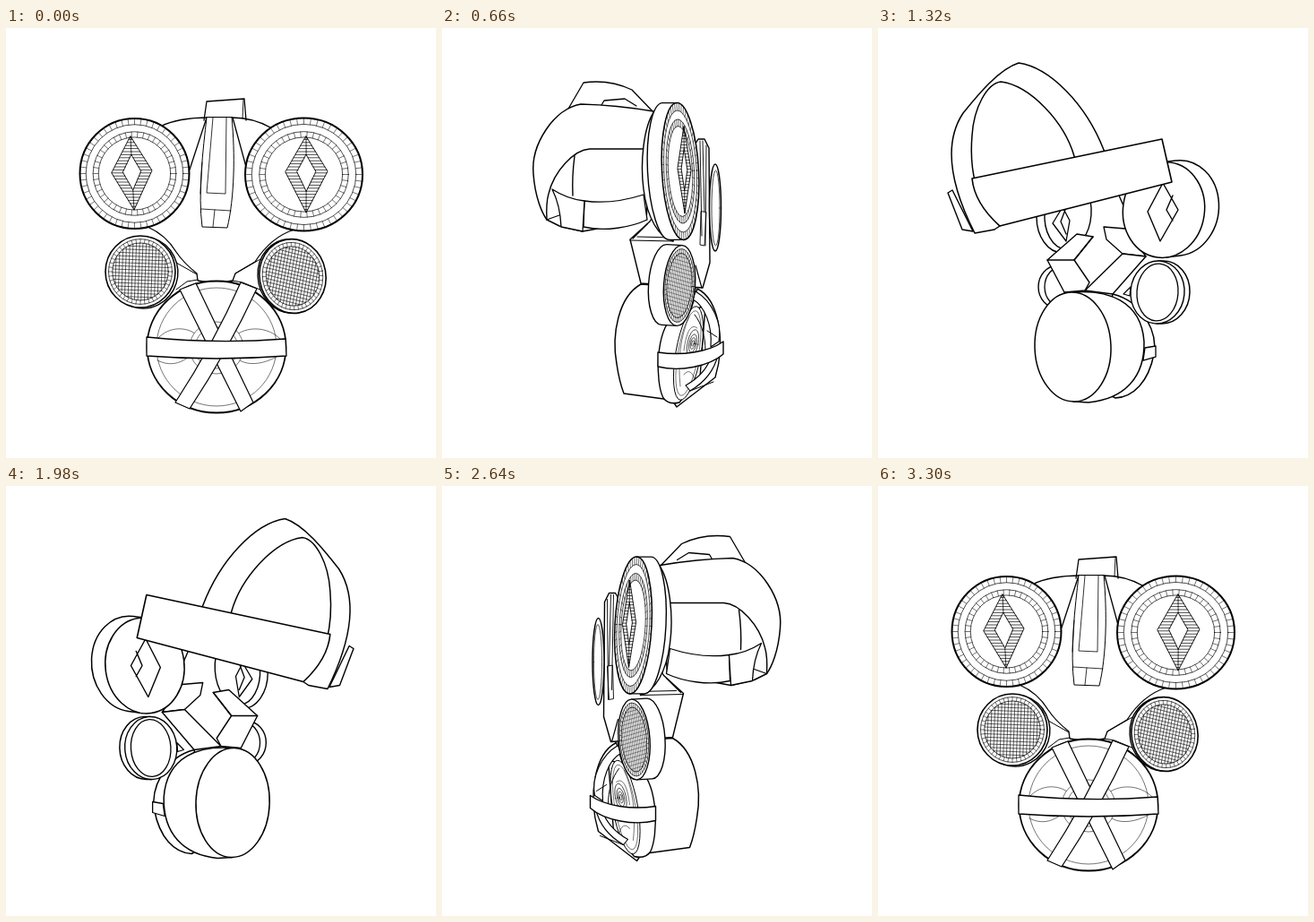
An HTML page that plays this animation: 480 by 480 pixels, repeating every 3.63 s.

```html
<!DOCTYPE html>
<html lang="en">
<head>
<meta charset="utf-8">
<title>Turning mask</title>
<style>
html, body { margin: 0; width: 100%; height: 100%; overflow: hidden; background: #fff; }
svg { display: block; width: 100vw; height: 100vh; }
path, circle { stroke: #000; stroke-linejoin: round; stroke-linecap: round; vector-effect: non-scaling-stroke; }
</style>
</head>
<body>
<svg id="stage" viewBox="0 0 480 480"></svg>
<script>
const STEP = 330, LOOP = 3630, THIN = 0.55;
const n = v => +v.toFixed(3);

// Filled shape, open line, ellipse with contents drawn in unit space
const shape = (d, w = 1.4, fill = '#fff') => `<path d="${d}" stroke-width="${w}" fill="${fill}"/>`;
const line = (d, w = 1.4) => shape(d, w, 'none');
const oval = (x, y, rx, ry, rot = 0, w = 1.4, inner = '', fill = '#fff') =>
  `<g transform="translate(${x} ${y}) rotate(${rot}) scale(${rx} ${ry})">` +
  `<circle r="1" stroke-width="${w}" fill="${fill}"/>${inner}</g>`;
const ring = (r, w = .7) => `<circle r="${r}" stroke-width="${w}" fill="none"/>`;
const flip = (body, sum, dy = 0, k = 1) => `<g transform="matrix(${-k} 0 0 1 ${sum} ${dy})">${body}</g>`;

function ticks(r1, r2, count) {
  let d = '';
  for (let i = 0; i < count; i++) {
    const a = i / count * 2 * Math.PI, c = Math.cos(a), s = Math.sin(a);
    d += `M${n(c * r1)} ${n(s * r1)}L${n(c * r2)} ${n(s * r2)}`;
  }
  return line(d, THIN);
}

function mesh(r, cells, turn, w) {
  let d = '';
  for (let i = 1; i < cells; i++) {
    const p = n(r * (2 * i / cells - 1)), h = n(Math.sqrt(r * r - p * p));
    d += `M${p} ${-h}V${h}M${-h} ${p}H${h}`;
  }
  return `<g transform="rotate(${turn})">${line(d, w)}</g>`;
}

// Side wall of a disc pushed back by dx, dy
function wall(x, y, rx, ry, rot, dx, dy, w = 1.4) {
  const a = rot * Math.PI / 180, c = Math.cos(a), s = Math.sin(a);
  const u = (c * dx + s * dy) / rx, v = (c * dy - s * dx) / ry, h = Math.hypot(u, v);
  const px = -v / h * rx, py = u / h * ry;
  const ex = c * px - s * py, ey = s * px + c * py;
  return shape(`M${n(x + ex)} ${n(y + ey)}l${dx} ${dy}A${rx} ${ry} ${rot} 0 0 ` +
    `${n(x - ex + dx)} ${n(y - ey + dy)}l${-dx} ${-dy}Z`, w);
}

const lensRings = ring(.89) + ticks(.89, 1, 52) + ring(.76) + ring(.66) + ticks(.66, .76, 42);
const lens = (x, y, rx, ry, rot = 0, w = 2) => oval(x, y, rx, ry, rot, w, lensRings);
const filter = (x, y, rx, ry, rot = 0, turn = 0, w = 1.6) =>
  oval(x, y, rx, ry, rot, w, ring(.91) + ring(.8) + ticks(.8, .91, 44) + mesh(.8, 17, turn, rx < 20 ? .4 : .6));

// x on a polyline that runs downwards
function xAt(pts, y) {
  for (let i = 1; i < pts.length; i++) {
    const [x0, y0] = pts[i - 1], [x1, y1] = pts[i];
    if (y <= y1) return x0 + (x1 - x0) * (y - y0) / (y1 - y0);
  }
  return pts[pts.length - 1][0];
}

function diamond(t, r, b, l, gap = 3.4) {
  const cx = (t[0] + r[0] + b[0] + l[0]) / 4, cy = (l[1] + r[1]) / 2;
  const [it, ir, ib, il] = [t, r, b, l].map(p => [cx + (p[0] - cx) * .45, cy + (p[1] - cy) * .48]);
  let d = `M${t}L${it}M${b}L${ib}`;
  for (let y = t[1] + gap; y < b[1]; y += gap) {
    for (const [o, i] of [[l, il], [r, ir]]) {
      d += `M${n(xAt([t, o, b], y))} ${n(y)}L${n(xAt([t, it, i, ib, b], y))} ${n(y)}`;
    }
  }
  const box = q => `M${q.join('L')}Z`;
  return line(box([t, r, b, l]), .9) + line(d, .7) + line(box([it, ir, ib, il]), .9);
}

function front() {
  return shape('M221 103L224 82L266 79L268 103', 1.3) + line('M265 80L264 101', .9) +
    line('M172 110C190 101 212 100 226 100H252C272 100 285 105 297 112', 1.3) +
    line('M224 100L205 158M253 100L268 155', 1.3) +
    shape('M224 100C220 135 214 185 219 222L247 223C255 190 256 140 252 100Z', 1) +
    line('M231 100L224 184L245 185L246 100M218 202L251 204M233 203L231 222M219 150L217 185', .8) +
    line('M158 222C172 228 182 237 190 250Q198 262 213 274L214 282Q234 286 253 282L256 274L278 261Q296 233 322 225', 1.3) +
    line('M190 262L213 275M190 292L202 283L214 281M256 274L284 258M253 282L264 284L286 293', 1) +
    lens(143.5, 162.5, 61, 61.5) + diamond([139, 121], [163, 159], [143, 203], [118, 162]) +
    lens(332.5, 163.5, 65.5, 63) + diamond([335, 121], [359, 160], [335, 206], [312, 161]) +
    wall(150, 272, 39, 40, 0, 3, 1) + filter(150, 272, 39, 40, 0, 2) +
    wall(320, 277, 37, 41.5, -10, -2, 0) + filter(320, 277, 37, 41.5, -10, 22) +
    oval(235, 356, 77.5, 73.5, 0, 1.8) + oval(235, 356, 67, 66, 0, THIN) +
    line('M169 371C181 377 193 376 204 367M170 346C182 333 203 332 216 345M254 345C268 332 292 333 306 347M258 369C270 379 290 374 302 367', THIN) +
    oval(235, 357, 30, 29, 0, THIN) + oval(235, 357, 24, 23, 0, THIN) + oval(235, 357, 16, 15, 0, THIN) +
    shape('M194 292L212 285L276 418L262 428Z', 1.2) +
    shape('M262 284L280 291Q248 360 205 425L189 418Q232 352 262 284Z', 1.2) +
    shape('M157 345Q235 353 312 347L313 366Q235 372 157 366Z', 1.3);
}

function quarter() {
  return shape('M227 94L242 73L280 64L299 65L308 73L349 97L383 106L382 124L374 172C368 192 358 201 345 208L316 212Z', 1.2) +
    line('M227 94L261 90Q268 72 284 66M358 158L374 142L376 155M360 160C366 180 352 198 338 206', 1.2) +
    line('M294 217V228M262 216L269 220L251 233', 1.2) +
    line('M160 215C162 228 170 239 175 250Q180 263 186 265L183 272M186 265L210 268L235 251L251 233M210 268L219 273M168 237L180 268M235 251L230 262', 1.3) +
    line('M199 101L186 150M231 98L236 110', 1.4) +
    shape('M199 102C194 135 190 180 193 217L211 218C219 182 229 140 230 98L216 95Z', 1) +
    line('M204 101L197 180L210 182L219 97M192 198L214 200M203 199L201 217M221 97L216 175', .8) +
    wall(152.5, 167.5, 30.5, 53.5, 8, 7, 0) + lens(152.5, 167.5, 30.5, 53.5, 8, 1.7) +
    diamond([153, 135], [161, 163], [147, 203], [138, 170]) +
    wall(289.5, 145, 62.5, 72.5, 12, 8, -1) + lens(289.5, 145, 62.5, 72.5, 12) +
    diamond([291, 97], [306, 147], [276, 193], [262, 146]) +
    shape('M262 300L283 311Q293 312 293 332C289 375 270 402 242 406L215 405Z', 1.2) +
    oval(210.5, 338, 54.5, 70, -8, 1.7) + oval(206, 338, 47, 66, -8, THIN) +
    line('M206 318C216 298 230 295 243 308M219 345C235 343 245 350 250 362M205 360C217 370 220 385 218 400M177 355C184 365 186 375 183 388', THIN) +
    [20, 15, 11, 7, 3.5].map(r => oval(197, 338, r * .8, r * 1.15, -6, r > 12 ? THIN : .8)).join('') +
    shape('M166 278L175 271C170 312 175 355 182 392L173 391C163 350 161 312 166 278Z', 1.1) +
    shape('M219 271L233 281C203 300 184 325 173 354L164 349C175 318 193 290 219 271Z', 1.1) +
    shape('M164 351L174 359C184 382 206 397 229 404L216 408C190 398 173 377 164 351Z', 1.1) +
    shape('M153 321C178 341 220 348 267 345L266 360C220 366 178 360 154 340Z', 1.3) +
    filter(158.5, 259.5, 12, 33, -3, 3, 1.2) +
    wall(269.5, 268.5, 39, 44.5, -8, 7, 0) + filter(269.5, 268.5, 39, 44.5, -8, 2);
}

function side() {
  return line('M137 97L158 61Q187 57 212 69L236 94M178 86L181 81L204 79L217 87', 1.3) +
    shape('M155 85C125 90 99 130 102 163C104 190 112 207 117 214L131 221L157 227L228 214L236 93Q195 86 155 85Z', 1.5) +
    line('M224 135H165C147 136 125 160 119 185Q116 195 117 214M148 143Q145 165 146 187', 1.4) +
    shape('M158 222C182 228 212 222 229 214L225 186C200 194 180 196 159 193Z', 1.3) +
    shape('M123 180Q140 191 159 193L157 227L133 222Q132 198 123 180Z', 1.3) +
    line('M117 214L131 209', 1.2) +
    shape('M286 124H293L298 134L299 262L291 290L222 285L210 236L232 216Z', 1.4) +
    line('M288 126L290 232M291 126L293 205M295 131L294 243M289 205L288 242L293 243L295 206Z', .9) +
    oval(305, 200.5, 6.5, 48.5, 0, 1.5) + oval(305.5, 201, 4.5, 42, 0, .7) +
    line('M210 237L258 238M218 233L260 234M229 219L213 235M283 265L290 290', 1.2) +
    shape('M237 93C225 110 221 150 225 180C229 212 242 234 258 238L266 160Z', 1.4) +
    wall(266, 160, 20.5, 76.5, -3, -16, 0, 1.4) +
    lens(266, 160, 20.5, 76.5, -3, 1.5) + diamond([270, 110], [278, 159], [271, 207], [263, 157], 3.4) +
    shape('M222 286C197 300 189 342 195 375Q198 395 203 408L262 416L283 290Z', 1.5) +
    shape('M285 291C309 303 317 350 305 390L262 423L250 405Z', 1.4) +
    line('M303 395L272 407M299 371C295 385 286 396 276 403', 1) +
    shape('M258 322C238 340 238 395 247 413Q253 421 265 418L288 390L294 310Z', 1.4) +
    oval(275, 363, 14, 53, 10, 1) + oval(275, 363, 11.5, 48, 10, THIN) +
    line('M276 322C266 345 263 370 266 400M285 335C276 328 272 345 270 360M270 387C276 378 284 388 281 400', THIN) +
    [12, 8, 5, 2.5].map(r => oval(280, 352, r * .5, r * 1.3, 12, .7)).join('') +
    shape('M283 294C302 305 313 330 309 350L300 356C302 332 293 310 280 303Z', 1.2) +
    line('M282 320C290 330 294 345 294 360M296 338L307 345', 1) +
    shape('M308 365C304 382 294 395 277 405L272 399C288 390 297 378 301 366Z', 1.1) +
    shape('M241 362C268 366 297 362 314 350V364C298 378 265 384 241 378Z', 1.4) +
    wall(265, 287.5, 17.5, 45, 4, -17, -1, 1.4) + filter(265, 287.5, 17.5, 45, 4, 5, 1.4);
}

function rearSide() {
  return shape('M94 178L91 183L104 224L116 226Z') +
    shape('M108 225C88 180 86 130 103 105C120 80 140 66 165 61C205 62 248 90 276 142L244 148C225 103 190 84 160 84C135 90 118 120 120 158C121 185 128 207 140 222L112 228Z', 1.5) +
    oval(262, 204, 17, 42, -2) + line('M262 180L269 207L262 234L256 207Z', 1.2) +
    shape('M236 230L209 260L228 293L282 292L304 252L276 222Z') +
    line('M209 260L252 259L268 292M252 259L275 232M282 292L262 258', 1.3) +
    wall(312, 182, 20, 64, -2, 23, 0, 1.5) + oval(312, 182, 20, 64, -2, 1.5) +
    line('M314 145L323 183L312 222L304 184ZM320 166L315 183L320 198', 1.3) +
    shape('M119 163C170 151 240 139 303 128L308 186C250 201 190 214 140 222C125 203 119 187 119 163Z', 1.5) +
    shape('M285 296C319 308 330 340 322 372C315 396 300 412 262 414L250 300Z') +
    shape('M200 291C270 286 300 302 306 345C307 388 285 415 200 413Z', 1.5) +
    oval(200, 352, 22, 61, -2, 1.5) + shape('M306 352L326 350V365L304 369Z', 1.3) +
    wall(286, 290, 17, 41, 2, 22, 0) + oval(286, 290, 17, 41, 2) + oval(287, 290, 14, 37, 2, 1.1);
}

function rearQuarter() {
  return shape('M83 181L78 184L94 225L106 227Z') +
    shape('M108 229C78 170 75 125 95 95C112 74 135 46 157 39C192 44 232 85 252 136L255 145L221 151L219 143C208 105 170 64 137 60C122 62 107 88 105 120C102 155 108 195 136 221L130 225Z', 1.5) +
    oval(206, 211, 29, 40, 0) + oval(212, 207, 26, 40, 4) +
    line('M206 200L195 218L210 238L214 215L206 200M209 203L204 216L210 230', 1.3) +
    line('M269 187L277 205') +
    shape('M252 222L276 224L299 255L273 252L255 236Z', 1.3) +
    wall(319, 203, 45.5, 53.5, 8, 16, -2, 1.5) + oval(319, 203, 45.5, 53.5, 8, 1.5) +
    line('M318 173L335 203L315 238L301 205ZM329 187L322 203L329 215', 1.4) +
    shape('M105 168L317 124L328 172L136 221C118 205 107 188 105 168Z', 1.6) +
    oval(201, 289, 22, 24, 0) + oval(206, 289, 20, 23, 0, 1.3) +
    shape('M189 259L222 230L240 233L219 259L236 284L231 293L208 295Z', 1.4) +
    line('M189 259H219M219 259L240 233', 1.4) +
    shape('M231 293L273 252L299 255L262 297Z', 1.4) +
    shape('M274 297L282 289L281 299Z', 1.2) +
    shape('M262 297C298 306 312 342 308 364C302 395 285 412 265 413L240 400Z', 1.5) +
    shape('M208 296C258 289 294 306 297 350C298 390 275 414 235 418L218 417Z', 1.5) +
    oval(217.5, 356, 42.5, 61, -2, 1.5) + shape('M298 357L310 355V367L296 371Z', 1.3) +
    wall(312, 295, 30, 35, 5, 6, 0, 1.5) + oval(312, 295, 30, 35, 5, 1.4) + oval(312, 295, 23, 32, 4, 1.3);
}

function rear() {
  const half = oval(149, 193, 53, 54, 0, 1.5) + oval(152, 194, 50, 52, 0, 1.3) +
    line('M150 160L169 195L150 231L131 195ZM150 178L141 195L150 212L159 195Z', 1.3) +
    oval(170, 291, 35, 35, 0, 1.5) + oval(172, 291, 29, 31, 0, 1.3) +
    shape('M190 252L220 228L235 236V296H212Z') + line('M190 252L216 257L235 236M216 257L227 296', 1.3);
  return half + flip(half, 470) +
    shape('M219 150L221 48Q235 40 249 48L251 150Z', 1.5) +
    shape('M119 137Q235 130 351 137L349 188Q235 200 121 188Z', 1.6) +
    shape('M219 136L216 226Q235 231 254 226L251 136', 1.5) +
    shape('M168 349L160 350V364L168 366ZM302 349L310 350V364L302 366Z', 1.3) +
    oval(235, 354, 70, 63, 0, 1.5) + oval(235, 355, 62, 61, 0, 1.5);
}

const views = [
  front(), flip(quarter(), 463, 17), side(), rearSide(), rearQuarter(), rear(),
  flip(rearQuarter(), 463.4, -2.5, .967), flip(rearSide(), 471, -2.5, .97),
  flip(side(), 479.5, -4.5), quarter(), front()
];
const stage = document.getElementById('stage');
stage.innerHTML = '<rect width="480" height="480" fill="#fff"/>' +
  views.map(v => `<g fill="none" display="none">${v}</g>`).join('');
const groups = [...stage.children].slice(1);

function draw(t) {
  const now = Math.floor(t % LOOP / STEP);
  groups.forEach((g, i) => g.setAttribute('display', i === now ? 'inline' : 'none'));
}

const start = performance.now();
function tick() {
  draw(performance.now() - start);
  requestAnimationFrame(tick);
}
tick();
</script>
</body>
</html>
```
